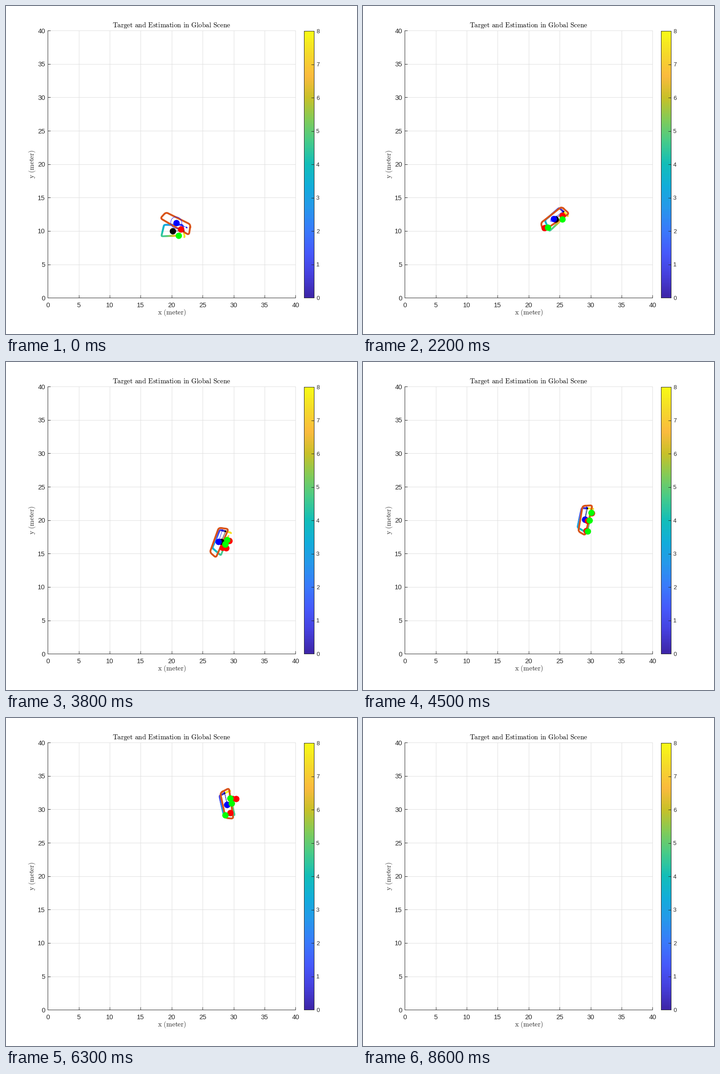
These frames come from a looping animation (775 by 723 pixels, 8.7 s). A matplotlib script:

```python
import numpy as np
import matplotlib.pyplot as plt
from matplotlib.animation import FuncAnimation
from matplotlib.colors import LinearSegmentedColormap

W, H, DPI = 775, 723, 100
FRAMES, STEP = 87, 100
PT = 72 / DPI  # points per pixel
INK = (0.15, 0.15, 0.15)
ORANGE = (0.851, 0.325, 0.098)
PARULA = LinearSegmentedColormap.from_list("parula", (
    "#3e26a8 #4640dd #4659fb #3a7afc #2797eb #12adda #12beb9 "
    "#45cb8b #81cc59 #c8c129 #fcbb3e #f5da2b #f9fb15").split())

plt.rcParams.update({"font.family": "Liberation Sans", "mathtext.fontset": "cm"})


def rounded(corners, cut):
    """Closed, densely sampled outline of a polygon with softened corners."""
    p = np.array(corners, float)
    u = np.linspace(0, 1, 12)[:, None]
    parts = []
    for a, b, c in zip(np.roll(p, 1, 0), p, np.roll(p, -1, 0)):
        s = b + (a - b) * min(0.5, cut / np.hypot(*(a - b)))
        e = b + (c - b) * min(0.5, cut / np.hypot(*(c - b)))
        parts.append((1 - u) ** 2 * s + 2 * u * (1 - u) * b + u ** 2 * e)
    out = np.vstack(parts + [parts[0][:1]])
    i = np.arange(len(out))
    fine = np.linspace(0, len(out) - 1, 40 * len(out))
    return np.column_stack([np.interp(fine, i, col) for col in out.T])


def by_angle(outline, n):
    """Resample a star-shaped outline at even angles from its centre."""
    ang = np.arctan2(outline[:, 1], outline[:, 0])
    rad = np.hypot(outline[:, 0], outline[:, 1])
    t = np.linspace(0, 2 * np.pi, n, endpoint=False)
    r = np.interp(t, ang, rad, period=2 * np.pi)
    return t, np.column_stack([r * np.cos(t), r * np.sin(t)])


def place(pts, center, angle):
    c, s = np.cos(angle), np.sin(angle)
    return np.asarray(pts) @ np.array([[c, s], [-s, c]]) + center


CAR = rounded([(1.56, 0.92), (-1.42, 0.92), (-1.86, -0.8),
               (1.2, -0.68), (1.92, -0.98)], 0.22)
ANGLES, CAR_DOTS = by_angle(CAR, 110)
BODY = rounded([(2.22, 0.68), (-2.15, 0.75), (-2.62, -0.45), (2.62, -0.86)], 0.4)
RING_T = np.linspace(0, 2 * np.pi, 60)
RING = np.column_stack([np.cos(RING_T), np.sin(RING_T)])
ARROW = np.array([(0, 0), (1, 0), (0.9, 0.05), (1, 0), (0.9, -0.05)])


def heading(k):
    return np.radians(1.86 * k - 0.0034 * k**2)


# The car speeds up steadily to a limit while it turns left.
mid = np.arange(FRAMES) + 0.5
speed = np.minimum(0.10 + 0.0097 * mid, 0.615)[:, None]
moves = speed * np.column_stack([np.cos(heading(mid)), np.sin(heading(mid))])
CENTERS = np.array([20.2, 10.0]) + np.vstack([np.zeros(2), np.cumsum(moves, 0)])


def estimate(k, center, angle):
    """Tracker pose: the first error dies out, with one lag in the turn."""
    dx = 0.55 * np.exp(-k / 5) - 0.95 * np.exp(-((k - 31) / 8) ** 2)
    dy = 1.25 * np.exp(-k / 7)
    turn = -24 * np.exp(-k / 28) * np.cos(np.pi * k / 14)
    return center + (dx, dy), angle + np.radians(turn)


def detections(k, center, angle):
    """Noisy points and the points on the near side of the car they come from."""
    rng = np.random.default_rng(100 + k)
    n = 1 + min(3, k // 16)
    pick = (rng.uniform(0.42, 1, n) * len(CAR_DOTS)).astype(int)
    surface = place(CAR_DOTS[pick], center, angle)
    spread = 0.4 + 0.8 * np.exp(-k / 10)
    return surface + rng.normal(0, spread, (n, 2)), surface


def inside(pts):
    pts = np.atleast_2d(pts)
    return pts[pts[:, 1] <= 40]


def roman(words):
    return r"$\mathrm{" + r"\hspace{0.38}".join(words.split()) + "}$"


def box(x0, y0, x1, y1):
    return [x0 / W, 1 - y1 / H, (x1 - x0) / W, (y1 - y0) / H]


fig = plt.figure(figsize=(W / DPI, H / DPI), dpi=DPI, facecolor="white")

ax = fig.add_axes(box(92.1, 54.3, 639.3, 643.1))
ax.set(xlim=(0, 40), ylim=(0, 40), xticks=range(0, 41, 5), yticks=range(0, 41, 5))
ax.set_axisbelow(True)
ax.grid(True, color="#dfdfdf", lw=PT)
for line in ax.get_xgridlines() + ax.get_ygridlines():
    line.set_clip_on(False)
for side in ("top", "right"):
    ax.spines[side].set_visible(False)
for side in ("left", "bottom"):
    ax.spines[side].set(color=INK, linewidth=PT)
ax.tick_params(direction="in", length=6 * PT, width=PT, color=INK,
               labelcolor=INK, labelsize=14.5 * PT)
ax.tick_params(axis="x", pad=9.5 * PT)
ax.tick_params(axis="y", pad=5.5 * PT)

bar = fig.add_axes(box(658, 55, 680, 643.1))
bar.imshow(np.linspace(0, 1, 256)[:, None], cmap=PARULA, origin="lower",
           aspect="auto", extent=(0, 1, 0, 8))
bar.set(xticks=[], yticks=range(9))
bar.yaxis.tick_right()
bar.tick_params(direction="in", length=6 * PT, width=PT, color=INK,
                labelcolor=INK, labelsize=12.9 * PT, pad=5 * PT)
for spine in bar.spines.values():
    spine.set(color=INK, linewidth=PT)


def label(x, y, words, color, **kw):
    fig.text(x / W, 1 - y / H, roman(words), color=color, fontsize=15.1 * PT,
             ha="center", va="baseline", **kw)


label(365.6, 47, "Target and Estimation in Global Scene", "black")
label(366, 680.5, "x (meter)", INK)
label(62, 349, "y (meter)", INK, rotation=90, rotation_mode="anchor")


def dots(color, z):
    return ax.plot([], [], "o", color=color, ms=14 * PT, mew=0,
                   clip_on=False, zorder=z)[0]


def stroke(color, width, z):
    return ax.plot([], [], color=color, lw=width * PT, zorder=z,
                   solid_joinstyle="round")[0]


car = ax.scatter([], [], s=(4.2 * PT) ** 2, c=[], cmap=PARULA, vmin=0, vmax=8,
                 linewidths=0, clip_on=False, zorder=3)
body = stroke(ORANGE, 4, 4)
true_arrow = stroke("black", 0.9, 5)
est_arrow = stroke("blue", 0.8, 5)
ellipse = stroke("blue", 0.8, 5)
true_dot, est_dot = dots("black", 6), dots("blue", 7)
noisy_dots, surface_dots = dots("red", 8), dots("lime", 9)


def put(line, pts):
    line.set_data(pts[:, 0], pts[:, 1])


def draw(k):
    center, angle = CENTERS[k], heading(k)
    guess, tilt = estimate(k, center, angle)
    length = max(0.88, 1 - 0.0026 * k)
    axes = (0.4 + 0.5 * np.exp(-(k / 25) ** 2), 0.2 + 0.66 * np.exp(-k / 7))

    pts = place(CAR_DOTS, center, angle)
    keep = pts[:, 1] <= 40
    car.set_offsets(pts[keep])
    car.set_array((ANGLES * 4 / np.pi)[keep])

    put(body, place(BODY * (length, 1), guess, tilt))
    put(true_arrow, place(ARROW * 1.85, center, angle))
    put(est_arrow, place(ARROW * 1.95, guess, tilt))
    put(ellipse, place(RING * axes, guess, tilt))

    put(true_dot, inside(center))
    put(est_dot, inside(guess))
    noisy, surface = detections(k, center, angle)
    put(noisy_dots, inside(noisy))
    put(surface_dots, inside(surface))
    return (car, body, true_arrow, est_arrow, ellipse, true_dot, est_dot,
            noisy_dots, surface_dots)


anim = FuncAnimation(fig, draw, frames=FRAMES, interval=STEP, repeat=True,
                     repeat_delay=0, blit=False)
plt.show()
```
